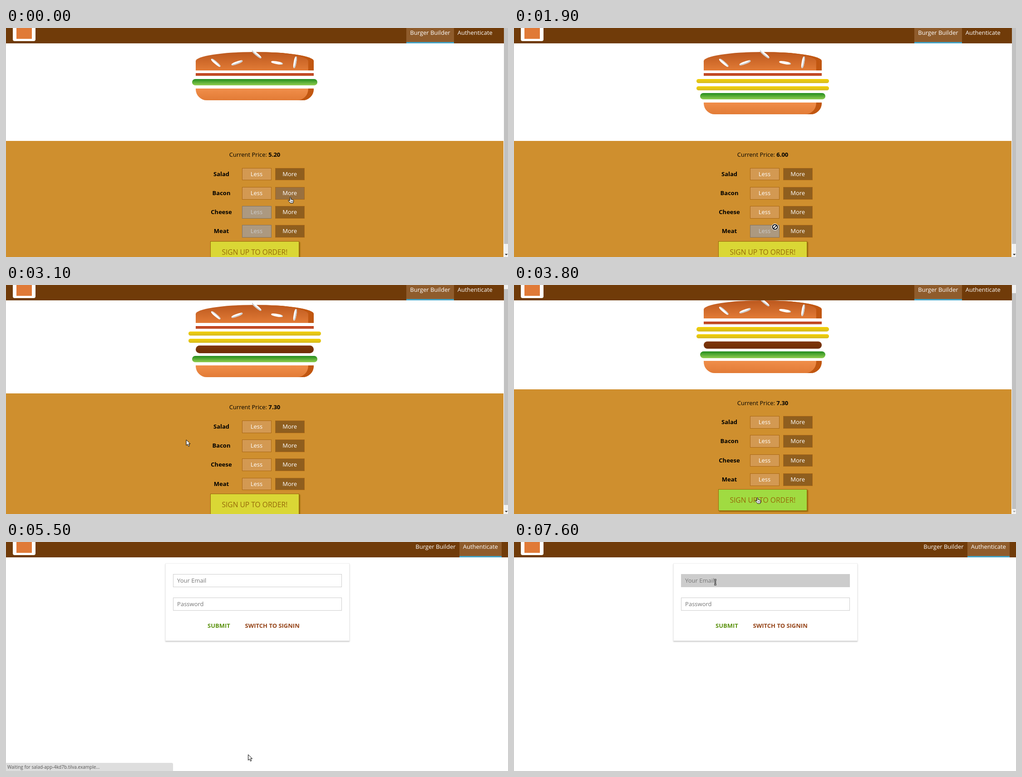
An HTML page that plays this animation: 1106x507 px, repeating every 8 s.

```html
<!DOCTYPE html>
<html lang="en">
<head>
<meta charset="utf-8">
<title>Burger Builder</title>
<style>
  * { box-sizing: border-box; }
  html, body { margin: 0; width: 100%; height: 100%; overflow: hidden; background: #fff; }
  body { position: relative; font: 13px "Open Sans", sans-serif; color: #000; }
  [hidden] { display: none !important; }
  #builder, #auth, .bar, .row, .box, #cursor, #caret, #status { position: absolute; }

  /* header */
  .bar { left: 0; top: 0; width: 100%; height: 34px; background: #703b09; overflow: hidden; z-index: 2; }
  .logo { position: absolute; left: 15px; top: -16px; width: 50px; height: 45px; border-radius: 4px; background: #fff; }
  .logo i { position: absolute; left: 8px; top: 6px; width: 34px; height: 34px; background: #e07a37; }
  nav { position: absolute; right: 26px; top: 0; height: 34px; display: flex; color: #fff; }
  nav span { padding: 1px 8.1px 0; border-bottom: 3px solid transparent; }
  nav .on { background: #8f5c2c; border-color: #40a4c8; }

  /* burger */
  #builder { left: 0; top: 0; width: 1096px; height: 560px; }
  .burger { position: absolute; left: 385.5px; top: 53.3px; width: 325px; height: 203.1px; }
  .burger > div { margin: 0 auto 6.5px; width: 80%; }
  .top, .bottom { box-shadow: inset -12.2px 0 #c15711; }
  .top { position: relative; height: 20%; background: linear-gradient(#bc581e, #e27b36); border-radius: 50% 50% 0 0; }
  .bottom { height: 13%; background: linear-gradient(#f08e4a, #e27b36); border-radius: 0 0 24.4px 24.4px; }
  .bacon { height: 3%; background: linear-gradient(#bf3813, #c45e38); }
  .burger .cheese { width: 90%; height: 4.5%; background: linear-gradient(#f4d004, #d6bb22); border-radius: 16px; }
  .meat { height: 8%; background: linear-gradient(#7f3608, #702e05); border-radius: 12px; }
  .burger .salad { width: 85%; height: 7%; background: linear-gradient(#228c1d, #91ce50); border-radius: 16px; }
  .seed, .seed::before, .seed::after { position: absolute; background: #fff; border-radius: 40%; }
  .seed { width: 10%; height: 15%; top: 50%; }
  .seed::before, .seed::after { width: 100%; height: 100%; }
  .s1 { left: 30%; transform: rotate(-20deg); box-shadow: inset -1.6px -2.4px #c9c9c9; }
  .s1::after { content: ""; left: -170%; top: -260%; transform: rotate(60deg); box-shadow: inset -.8px 1.6px #c9c9c9; }
  .s1::before { content: ""; left: 180%; top: -50%; transform: rotate(60deg); box-shadow: inset -.8px -2.4px #c9c9c9; }
  .s2 { left: 64%; transform: rotate(10deg); box-shadow: inset -2.4px 0 #c9c9c9; }
  .s2::before { content: ""; left: 150%; top: -130%; transform: rotate(90deg); box-shadow: inset -.8px 2.4px #c9c9c9; }

  /* controls */
  .panel { position: absolute; left: 0; top: 250px; width: 100%; height: 310px; background: #cf8f2e; }
  .price { position: absolute; left: 0; top: 21px; width: 100%; text-align: center; }
  .row { left: 442px; height: 27.7px; }
  .row > * { position: absolute; top: 0; width: 65px; height: 27.7px; padding-top: 5.06px; line-height: 17.7px; text-align: center; }
  .row span { border: 1px solid #aa6817; padding-top: 4.06px; color: #fff; }
  .less { left: 77.5px; background: #d39952; }
  .more { left: 150.7px; background: #8f5e1e; }
  .more.hot { background: #99703f; }
  .row .off { background: #ac9980; border-color: #7e7365; color: #ccc; }
  .order { position: absolute; left: 450px; top: 221.5px; padding: 12.2px 24.4px; border: 1px solid #966909;
    background: #dad735; color: #966909; font-size: 15.6px; white-space: nowrap; box-shadow: 2px 2px 2px #966909; }
  .order.hot { background: #a0db41; }
  #scroll { position: absolute; right: 0; top: 0; width: 9px; height: 100%; background: #f1f1f1; z-index: 3; }
  #thumb { position: absolute; width: 100%; height: 478px; background: #c1c1c1; }
  #scroll svg { position: absolute; left: 2px; top: 500px; }

  /* sign-up form */
  #auth { left: 351px; top: 47px; width: 406px; height: 172px; border: 1px solid #eee; box-shadow: 0 1.6px 2.4px #ccc; }
  .box { left: 16px; width: 372px; height: 29px; border: 1px solid #ccc; padding: 4px 8.1px; line-height: 18px; color: #757575; }
  .box.hot { background: #ccc; }
  #auth b { position: absolute; top: 128px; white-space: nowrap; }
  #caret { left: 378px; top: 77px; width: 1px; height: 17px; background: #000; }
  #status { left: 0; top: 489px; width: 368px; height: 18px; padding: 2px 3px; border-radius: 0 3px 0 0;
    background: #dedede; color: #555; font-size: 10px; line-height: 14px; white-space: nowrap; }
  #cursor { left: 0; top: 0; width: 18px; height: 20px; z-index: 4; overflow: visible; }
</style>
</head>
<body>
<div class="bar">
  <div class="logo"><i></i></div>
  <nav><span>Burger Builder</span><span>Authenticate</span></nav>
</div>

<div id="builder">
  <div class="burger">
    <div class="top"><i class="seed s1"></i><i class="seed s2"></i></div>
    <div class="bacon"></div>
    <div class="cheese"></div>
    <div class="cheese"></div>
    <div class="meat"></div>
    <div class="salad"></div>
    <div class="bottom"></div>
  </div>
  <div class="panel">
    <div class="price">Current Price: <b id="price"></b></div>
    <div class="order">SIGN UP TO ORDER!</div>
  </div>
</div>
<div id="scroll">
  <div id="thumb"></div>
  <svg width="7" height="4"><path d="M0 0H6.4L3.2 3.2z"/></svg>
</div>

<div id="auth">
  <div class="box" id="email" style="top:23px">Your Email</div>
  <div class="box" style="top:75px">Password</div>
  <b style="left:92px;color:#5c9210">SUBMIT</b>
  <b style="left:174.5px;color:#944317">SWITCH TO SIGNIN</b>
</div>
<div id="caret"></div>
<div id="status">Waiting for salad-app-4kd7b.tilva.example...</div>

<svg id="cursor" fill="#fff" stroke="#000" stroke-linejoin="round">
  <g data-kind="arrow"><path d="M.6.8V13.2L3.5 10.5 5.6 15.3 7.8 14.3 5.7 9.7H9.6z"/></g>
  <g data-kind="hand">
    <path d="M4.3 8.6V1.9a1.2 1.2 0 0 1 2.4 0V5.4l4.5.9q1.7.4 1.5 2l-.5 2.9-.9 2.6H5.6L3.5 11 .9 8.7q-.6-1.3.9-1.4z"/>
    <path d="M8.6 8.5v3M10.5 8.5v3M6.7 8.5v3" stroke-width=".7"/>
  </g>
  <g data-kind="deny">
    <circle cx="7.5" cy="7.5" r="6.9" stroke="#fff" stroke-width="1"/>
    <circle cx="7.5" cy="7.5" r="5.3" stroke-width="2"/>
    <path d="M4.2 11 11 4.2" stroke-width="1.7"/>
  </g>
  <g data-kind="beam" fill="none">
    <path id="stem" d="M1.3 2H5.7M3.5 2V13M1.3 13H5.7" stroke-width="2.8"/>
    <use href="#stem" style="display:none"/>
    <path d="M1.3 2H5.7M3.5 2V13M1.3 13H5.7" stroke="#fff" stroke-width=".9"/>
  </g>
</svg>

<script>
const LOOP = 8000;
const $ = s => document.querySelector(s);
const $$ = s => [...document.querySelectorAll(s)];

// [time, cursor kind, left, top]
const pointer = [
  [0, "hand", 621, 374], [100, "arrow", 617, 396], [500, "hand", 617, 396],
  [1500, "hand", 612, 402], [1600, "arrow", 602, 422], [1700, "arrow", 590, 427],
  [1800, "arrow", 579, 430], [1900, "deny", 567.5, 433], [2000, "deny", 562, 444],
  [2100, "deny", 562, 453], [2200, "arrow", 585, 450], [2300, "hand", 610, 446],
  [2400, "hand", 606, 446], [3100, "arrow", 396.5, 342], [3400, "arrow", 430, 390],
  [3500, "arrow", 500, 448], [3700, "hand", 522, 463], [3800, "hand", 531, 470],
  [5300, "hand", 530, 470], [5500, "arrow", 533, 470], [6000, "arrow", 440, 390],
  [6100, "arrow", 331, 308], [6300, "arrow", 299, 3], [6400, "arrow", 449, 44],
  [6600, "beam", 441, 81], [6800, "beam", 440, 81.5]
];

// [time, changed properties]
const steps = [
  [0, { price: "5.20", cheese: 0, meat: 0, scroll: 0, hover: "Bacon", auth: false, status: 0, focus: false, caret: false }],
  [100, { hover: "" }],
  [500, { hover: "Cheese" }],
  [800, { price: "5.60", cheese: 1 }],
  [1100, { price: "6.00", cheese: 2 }],
  [1600, { hover: "" }],
  [2300, { hover: "Meat" }],
  [2600, { price: "7.30", meat: 1 }],
  [3100, { scroll: 9.75, hover: "" }],
  [3300, { scroll: 19.5 }],
  [3700, { hover: "order" }],
  [5500, { auth: true, status: 1 }],
  [5700, { status: 0.5 }],
  [5800, { status: 0 }],
  [7100, { focus: true, caret: true }],
  [7600, { caret: false }]
];

const rows = ["Salad", "Bacon", "Cheese", "Meat"].map((name, i) => {
  const row = document.createElement("div");
  row.className = "row";
  row.style.top = 59.6 + i * 42.25 + "px";
  row.innerHTML = `<b>${name}</b><span class="less">Less</span><span class="more">More</span>`;
  $(".panel").append(row);
  return { name, less: row.children[1], more: row.children[2] };
});
const cheeses = $$(".burger .cheese");
const kinds = $$("#cursor g");
const links = $$("nav span");

function draw(t) {
  const s = Object.assign({}, ...steps.filter(step => step[0] <= t).map(step => step[1]));

  $("#builder").hidden = $("#scroll").hidden = s.auth;
  $("#auth").hidden = !s.auth;
  $("nav").style.right = s.auth ? "14px" : "26px";
  links.forEach((link, i) => link.classList.toggle("on", i === Number(s.auth)));

  $("#builder").style.top = -s.scroll + "px";
  $("#thumb").style.top = s.scroll * 0.94 + "px";
  $("#scroll path").setAttribute("fill", s.scroll > 19 ? "#a3a3a3" : "#333");
  $("#price").textContent = s.price;
  cheeses.forEach((el, i) => el.hidden = i >= s.cheese);
  $(".burger .meat").hidden = !s.meat;
  const count = { Salad: 1, Bacon: 1, Cheese: s.cheese, Meat: s.meat };
  for (const { name, less, more } of rows) {
    less.classList.toggle("off", !count[name]);
    more.classList.toggle("hot", s.hover === name);
  }
  $(".order").classList.toggle("hot", s.hover === "order");

  $("#status").style.opacity = s.status;
  $("#email").classList.toggle("hot", s.focus);
  $("#caret").hidden = !s.caret;

  const [, kind, x, y] = pointer.filter(p => p[0] <= t).pop();
  kinds.forEach(g => g.style.display = g.dataset.kind === kind ? "" : "none");
  $("#cursor").style.transform = `translate(${x}px, ${y}px)`;
}

function tick() {
  draw(performance.now() % LOOP);
  requestAnimationFrame(tick);
}
tick();
</script>
</body>
</html>
```
